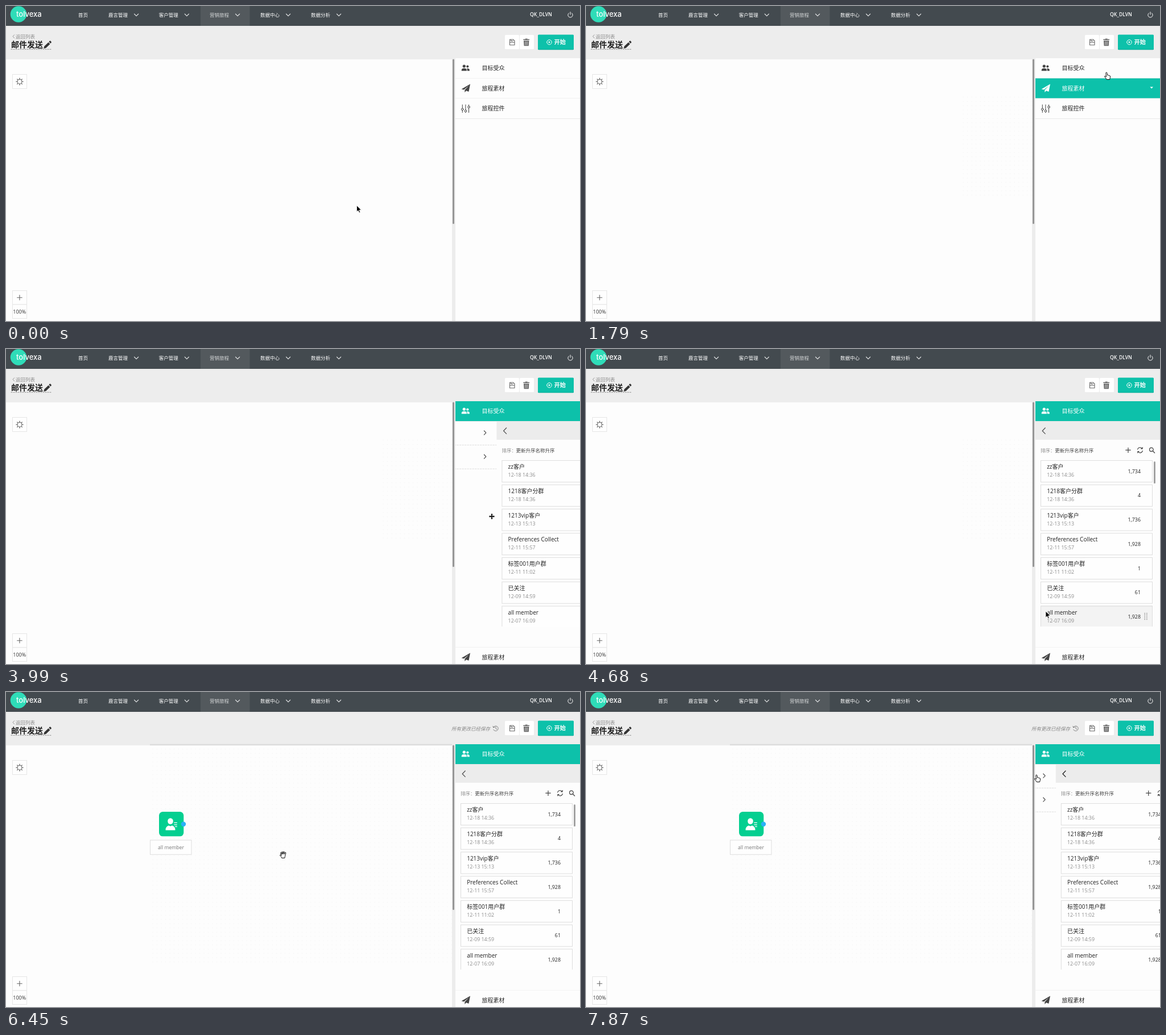
An HTML page that plays this animation: 1009 by 555 pixels, repeating every 8000 ms.

```html
<!DOCTYPE html>
<html lang="zh-CN">
<head>
<meta charset="utf-8">
<title>Journey builder</title>
<style>
html, body { margin: 0; width: 100%; height: 100%; overflow: hidden; background: #fdfdfd; }
svg { display: block; width: 1009px; height: 555px; }
text { font-family: 'Open Sans', 'Noto Sans CJK SC', 'Noto Sans CJK JP', sans-serif; white-space: pre; }
.ln { fill: none; stroke: currentColor; stroke-linecap: round; stroke-linejoin: round; }
.row { color: #444; }
.row .bg { fill: #fdfdfd; }
.row text { fill: #222; }
.row .tri { display: none; }
.row.on { color: #fff; }
.row.on .bg { fill: #0dc1aa; }
.row.on text { fill: #fff; }
.row.on .tri { display: inline; }
</style>
</head>
<body>
<svg id="stage" viewBox="0 0 1009 555" xmlns="http://www.w3.org/2000/svg"></svg>
<script>
const TEAL = '#0dc1aa', LOOP = 8000, PANE = 219;

const rect = (x, y, w, h, fill, more = '') =>
  `<rect x="${x}" y="${y}" width="${w}" height="${h}" fill="${fill}" ${more}/>`;
const text = (x, y, s, size, fill, more = '') =>
  `<text x="${x}" y="${y}" font-size="${size}" fill="${fill}" ${more}>${s}</text>`;
const line = (d, color, w = 1, more = '') =>
  `<path class="ln" d="${d}" style="color:${color}" stroke-width="${w}" ${more}/>`;
const group = (id, body, more = '') => `<g id="${id}" ${more}>${body}</g>`;
const range = n => Array.from({ length: n }, (_, i) => i);

// ---------- top bar and header ----------
function navBar() {
  const items = [['首页', 127], ['鹿言管理', 180], ['客户管理', 268.7], ['营销旅程', 358], ['数据中心', 447], ['数据分析', 536]];
  const menu = items.map(([s, x], i) =>
    text(x, 18.6, s, 8.5, i === 3 ? '#d6d8d9' : '#fff', 'font-weight="500"') +
    (i ? line(`M${x + 45.5} 14l3.6 3.6 3.6-3.6`, '#e4e6e7', 1.1) : '')).join('');
  return rect(0, 0, 1009, 35, '#434a4f') + rect(342, 0, 86.5, 35, '#53595d') + menu +
    '<circle cx="22" cy="14.5" r="14.3" fill="#2fdcb8"/>' +
    text(18, 19.2, 'tolvexa', 13, '#fff', `style="font-family:Inter,sans-serif" font-weight="500"`) +
    text(921, 18.4, 'QK_DLVN', 8.6, '#fff', 'font-weight="600"') +
    line('M989.3 12.6a4.2 4.2 0 1 0 5.4 0M992 10.6v4.4', '#fff', 1);
}

function header() {
  return rect(0, 35, 1009, 59, '#ededed') +
    line('M14.6 50.8l-2.6 2.8 2.6 2.8', '#888', .9) +
    text(17, 57, '返回列表', 8.5, '#8a8a8a') +
    text(9, 73.2, '邮件发送', 14, '#222', 'font-weight="700"') +
    line('M9 76.3H79', '#777', .8, 'stroke-dasharray="2 2"') +
    '<path d="M66.3 75l.9-3.9 7.3-7.2 3 3-7.3 7.2zM75.3 63.1l1.5-1.5q.7-.6 1.4 0l1.4 1.4q.6.7 0 1.4l-1.4 1.5z" fill="#333"/>' +
    rect(877, 51, 25, 25, '#fff', 'rx="1.5"') + rect(903, 51, 25, 25, '#fff', 'rx="1.5"') +
    line('M885.5 59h6l2.5 2.5v7.3h-8.5zM886 64.3h8M887.6 59.3v2.3h3.4', '#666', 1.1) +
    '<path d="M909.3 58.6h3.2l.5-1.2h3.4l.5 1.2h3.2v1.5h-10.8zM910 61h9.4l-.6 9.2h-8.2z" fill="#666"/>' +
    line('M912.7 62.6v6M914.7 62.6v6M916.7 62.6v6', '#fff', .6) +
    rect(935, 51.2, 63, 26, '#0aa592', 'rx="1.5"') + rect(935, 50.6, 63, 25.8, TEAL, 'rx="1.5"') +
    line('M950.8 63.8a4.2 4.2 0 1 0 8.4 0a4.2 4.2 0 1 0-8.4 0', '#fff', 1) +
    '<path d="M953.8 61.8l3.2 2-3.2 2z" fill="#fff"/>' +
    text(963.5, 67.4, '开始', 10.2, '#fff', 'font-weight="700"') +
    group('saved',
      text(783, 67.6, '所有更改已经保存', 8.5, '#888', 'font-style="italic"') +
      line('M857 62a4.4 4.4 0 1 1-.2 4.2M856 60.2l.7 2.5 2.5-.6M861 61.8v2.8l2 1.2', '#777', .9));
}

// ---------- canvas ----------
function canvas() {
  const box = (y, h) => rect(11.5, y, 25, h, '#fefefe', 'stroke="#e6e6e6"');
  return rect(0, 94, 784, 461, '#fdfdfd') +
    '<path id="dots" fill="url(#grid)"/>' +
    group('edge', rect(253, 91.6, 531, 2.6, '#dcdcdc')) +
    rect(784, 94, 6, 461, '#ececec') + rect(785, 93.5, 3, 290.5, '#969696', 'rx="1.5"') +
    box(120.5, 25) +
    '<circle cx="24" cy="133.2" r="3.9" fill="none" stroke="#666" stroke-width="1.1"/>' +
    range(8).map(i => line('M24 128.4v-1.3', '#666', 1.3, `transform="rotate(${i * 45} 24 133.2)"`)).join('') +
    box(501.5, 24.5) + box(526, 24.5) +
    line('M19.6 513.7h8.6M23.9 509.4v8.6', '#666', 1.1) +
    text(12.3, 541.8, '100%', 9, '#333') +
    rect(11, 551, 26, 4, '#fefefe');
}

function node() {
  return rect(269, 211, 43.3, 43.3, '#04cf90', 'rx="6.5"') +
    '<g fill="#fff"><ellipse cx="289" cy="227.6" rx="4.8" ry="5.4"/>' +
    '<path d="M280.6 243.4q-.6-6 5.4-8.2l3 1.2 3-1.2q6 2.2 5.4 8.2z"/></g>' +
    line('M295.8 230.4h4.6M295.8 233.8h4.6M297.6 237.2h2.8', '#fff', 1.2) +
    '<circle cx="312" cy="232.8" r="4.2" fill="#2cb0f6"/>' +
    rect(253.5, 261, 72.5, 25.3, '#fefefe', 'stroke="#dedede"') +
    text(290, 277, 'all member', 8.65, '#777', 'text-anchor="middle"');
}

// ---------- side panel ----------
const rowIcons = [
  '<g fill="currentColor"><circle cx="805.3" cy="106" r="2.6"/><circle cx="811.3" cy="106.6" r="2.1"/>' +
  '<path d="M800.8 114.3v-1.6q0-3 4.5-3t4.5 3v1.6zM810.8 114.3v-1.8q0-1.5-1-2.4 5-.6 5 2.6v1.6z"/></g>',
  '<path fill="currentColor" d="M800.6 146.4l15.4-9-2.6 13.6-4.5-1.8-2.5 3v-4.2l7.2-7.8-8.6 7.3z"/>',
  '<g class="ln" stroke-width="1"><path d="M802.3 174v6M802.3 184v3.6M807.9 174v9M807.9 187v.6M813.5 174v2M813.5 180v7.6"/>' +
  '<circle cx="802.3" cy="182" r="1.8"/><circle cx="807.9" cy="185" r="1.8"/><circle cx="813.5" cy="178" r="1.8"/></g>'
];
const rowTops = [92, 127.5, 163];

function row(i, label) {
  const y = rowTops[i];
  return group('row' + i,
    rect(790, y, PANE, 35.3, 'none', 'class="bg"') + rect(790, y + 35, PANE, 1, '#e8e8e8') + rowIcons[i] +
    text(836.6, y + 21.2, label, 10, '#222', 'font-weight="500"') +
    `<path class="tri" d="M991.4 ${y + 15}h5.6l-2.8 2.9z" fill="#fff"/>`, 'class="row"');
}

const cards = [
  ['zz客户', '12-18 14:36', '1,734'], ['1218客户分群', '12-18 14:36', '4'], ['1213vip客户', '12-13 15:13', '1,736'],
  ['Preferences Collect', '12-11 15:57', '1,928'], ['标签001用户群', '12-11 11:02', '1'],
  ['已关注', '12-09 14:59', '61'], ['all member', '12-07 16:09', '1,928']
];

const handle = range(10).map(i =>
  rect(182.6 + (i % 2) * 3.6, 12.5 + (i >> 1) * 2.7, 1.3, 1.3, '#777')).join('');

function card([name, date, count], fill = '#fefefe') {
  return rect(.5, .5, 196, 38, fill, 'stroke="#dedede"') +
    text(11.2, 15, name, 10, '#222') + text(11.2, 29.2, date, 8.85, '#8c8c8c') +
    text(176, 22.6, count, 8.9, '#222', 'text-anchor="end"');
}

function categories() {
  return ['客户分群', '客户标签'].map((s, i) => {
    const y = 147.6 + i * 42;
    return text(799, y + 3.5, s, 9.5, '#333') + line(`M987 ${y - 3.6}l3.4 3.6-3.4 3.6`, '#444', 1.1) +
      line(`M791 ${y + 21.6}H1009`, '#d8d8d8', .9, 'stroke-dasharray="2.5 2"');
  }).join('');
}

function segments() {
  const last = cards.length - 1;
  return rect(790, 127, PANE, 398, '#fdfdfd') + rect(790, 127, PANE, 32.8, '#ececec') +
    `<path id="back" class="ln" d="M807.2 139l-5 5.2 5 5.2" stroke-width="1.3"/>` +
    text(799, 181.6, '排序：', 8.5, '#8a8a8a') + text(824.2, 181.6, '更新升序名称升序', 8.5, '#444') +
    line('M948.8 178.2h8.4M953 174v8.4', '#444', 1.2) +
    line('M969.6 177a4.5 4.5 0 0 1 8.2-1.4M978.4 179.4a4.5 4.5 0 0 1-8.2 1.4M978.4 173.4l-.4 2.6-2.4-.4M969.6 183l.4-2.6 2.4.4', '#444', 1.1) +
    line('M990.6 177.2a3.3 3.3 0 1 0 6.6 0a3.3 3.3 0 1 0-6.6 0M996.4 179.8l3.2 3.2', '#444', 1.3) +
    '<g clip-path="url(#listClip)">' +
    cards.map((c, i) => `<g transform="translate(799 ${196 + i * 42.75})">${card(c)}</g>`).join('') +
    group('picked', card(cards[last], '#f3f3f3') + handle, `transform="translate(799 ${196 + last * 42.75})"`) +
    '</g>' + rect(998, 198, 3, 39, '#a2a2a2', 'rx="1.5"');
}

const spinner = range(8).map(i => {
  const a = i * Math.PI / 4;
  return `<circle class="dot" cx="${903.5 + 11.2 * Math.cos(a)}" cy="${329.2 + 11.2 * Math.sin(a)}" fill="${TEAL}"/>`;
}).join('');

// ---------- pointers ----------
const pointers = {
  arrow: '<path d="M0 0v11.2l2.6-2.4 1.7 4 1.9-.8-1.7-3.9h3.6z" fill="#000" stroke="#fff" stroke-width=".8"/>',
  hand: '<path d="M-1.2 1.2q0-1.2 1-1.2t1.2 1.2l.6 3.8q.8-.8 1.6.2 1-.6 1.6.5 1.6-.3 1.7 1.2.2 2.4-1 5.600h-5.300q-1-2.400-3.600-4.800-.6-1.400 1.200-1.100l1.700 1.200z" fill="#fff" stroke="#000" stroke-width=".95" stroke-linejoin="round"/>',
  grab: '<path d="M-2.800 6q-.4-2-2.900-4.300-.5-1.600.900-1.200l1.600 1.300-1.700-4.600q.2-1.600 1.500-.4l1.200 2.600-.6-4q.8-1.500 1.700 0l.6 3.600.5-4q1.200-1 1.700.3l-.1 4 1.300-3q1.400-.6 1.500.7l-1.400 5.800-.6 3.200z" fill="#fff" stroke="#000" stroke-width=".95" stroke-linejoin="round"/>',
  move: '<g stroke="#fff" stroke-width=".5">' + range(4).map(i =>
    `<path d="M-.7 0v-2.700h-1.500L0-5.400 2.200-2.700H.7V0z" transform="rotate(${i * 90})"/>`).join('') +
    '</g><path d="M-3 0h6M0-3v6" stroke="#000" stroke-width="1.400"/>'
};

const stage = document.getElementById('stage');
stage.innerHTML =
  '<defs><pattern id="grid" width="7.5" height="7.5" patternUnits="userSpaceOnUse">' +
  '<circle cx="3" cy="3" r=".7" fill="#f1f1f1"/></pattern>' +
  '<clipPath id="listClip"><path d="M790 190H1100V489H790z"/></clipPath>' +
  '<clipPath id="paneClip"><path d="M790 127H1009V525H790z"/></clipPath></defs>' +
  header() + navBar() + canvas() + group('node', node()) +
  rect(790, 92, PANE, 463, '#fdfdfd') +
  group('spin', spinner) +
  group('panes', group('cats', categories()) + group('list', segments()), 'clip-path="url(#paneClip)"') +
  row(0, '目标受众') + group('lower', rect(790, 127, PANE, 1, '#e8e8e8') + row(1, '旅程素材') + row(2, '旅程控件')) +
  group('drag', card(cards[6], '#f0f0f0') + handle, 'opacity=".85"') +
  Object.keys(pointers).map(k => group(k, pointers[k])).join('');

// ---------- motion ----------
const ticks = [0, 300, 540, 840, 1000, 1160, 1310, 1470, 1640, 1790, 1940, 2130, 2310, 2500, 2680, 2890,
  3190, 3340, 3490, 3780, 3990, 4230, 4500, 4660, 4810, 4970, 5130, 5280, 5440, 5590, 5770, 5940, 6110,
  6280, 6450, 6590, 6740, 6890, 7040, 7200, 7350, 7510, 7660, 7870];

const path = [[0, 616.5, 351.5], [540, 623, 344], [840, 655, 324], [1790, 915, 117], [1940, 905, 108],
  [2680, 847, 339.5], [3000, 847, 339.5], [3490, 984, 146], [3780, 930, 195], [3990, 854, 295],
  [4230, 830, 400], [4660, 808, 462], [5440, 371, 265], [5590, 293, 235.800], [5770, 252, 231],
  [5940, 280, 240], [6450, 487.500, 286.500], [6590, 492, 285.500], [7660, 792, 146], [LOOP, 792, 146]];

const clamp = v => Math.max(0, Math.min(1, v));
const swing = (t, start, dur = 400) => .5 - Math.cos(Math.PI * clamp((t - start) / dur)) / 2;

function pointAt(t) {
  const i = Math.max(1, path.findIndex(p => p[0] >= t));
  const [a, b] = [path[i - 1], path[i]];
  const k = clamp((t - a[0]) / (b[0] - a[0]));
  return [a[1] + (b[1] - a[1]) * k, a[2] + (b[2] - a[2]) * k];
}

function pointerAt(t, x, y) {
  if (t >= 5940) return x < 785 ? 'grab' : 'hand';
  if (t >= 4660) return 'arrow';
  if (t >= 3900) return 'move';
  if (t >= 2000) return t > 3000 && y < 212 ? 'hand' : 'arrow';
  return x >= 790 ? 'hand' : 'arrow';
}

// Hover colour trails the pointer slightly
function hoverRow(t) {
  const [x, y] = pointAt(Math.max(0, t - 150));
  return x < 790 ? -1 : rowTops.findIndex(top => y >= top && y < top + 35.5);
}

const $ = id => document.getElementById(id);
const show = (id, on) => { $(id).style.display = on ? '' : 'none'; };
const shift = (id, x, y = 0) => $(id).setAttribute('transform', `translate(${x} ${y})`);
const spots = [...document.querySelectorAll('.dot')];

function draw(t) {
  const [x, y] = pointAt(t);
  const open = t >= 2000, dropped = t >= 5940;

  const kind = pointerAt(t, x, y);
  for (const k in pointers) show(k, k === kind);
  shift(kind, x, y);

  const hot = open ? 0 : hoverRow(t);
  rowTops.forEach((_, i) => $('row' + i).classList.toggle('on', i === hot));
  $('row0').querySelector('.tri').style.display = open ? 'none' : '';
  shift('lower', 0, 398 * swing(t, 1960));

  show('spin', t >= 2300 && t < 2890);
  const head = Math.round((t - 2680) / 125);
  spots.forEach((s, i) => {
    const age = (((head - i) % 8) + 8) % 8;
    s.setAttribute('r', 2.9 - age * .12);
    s.setAttribute('opacity', Math.max(.45, 1 - age * .13));
  });

  const off = PANE * (1 - swing(t, 3746) + swing(t, 7764));
  show('panes', t >= 2890);
  shift('cats', off - PANE);
  shift('list', off);
  $('back').style.color = t >= 7660 ? '#222' : '#555';

  show('picked', t >= 4500 && !dropped);
  show('drag', t >= 4810 && !dropped);
  shift('drag', x - 9, y - 9);

  show('node', dropped);
  show('saved', t >= 6110);
  show('edge', dropped);
  $('dots').setAttribute('d', dropped ? 'M253 95H784V482H253z' :
    (t >= 1310 ? 'M660 155H784V335H660z' : '') + (t >= 5440 ? 'M366 230H784V482H366z' : ''));
}

const begin = performance.now();
function frame() {
  const t = (performance.now() - begin) % LOOP;
  draw(ticks.filter(k => k <= t).pop() || 0);
  requestAnimationFrame(frame);
}
frame();
</script>
</body>
</html>
```
